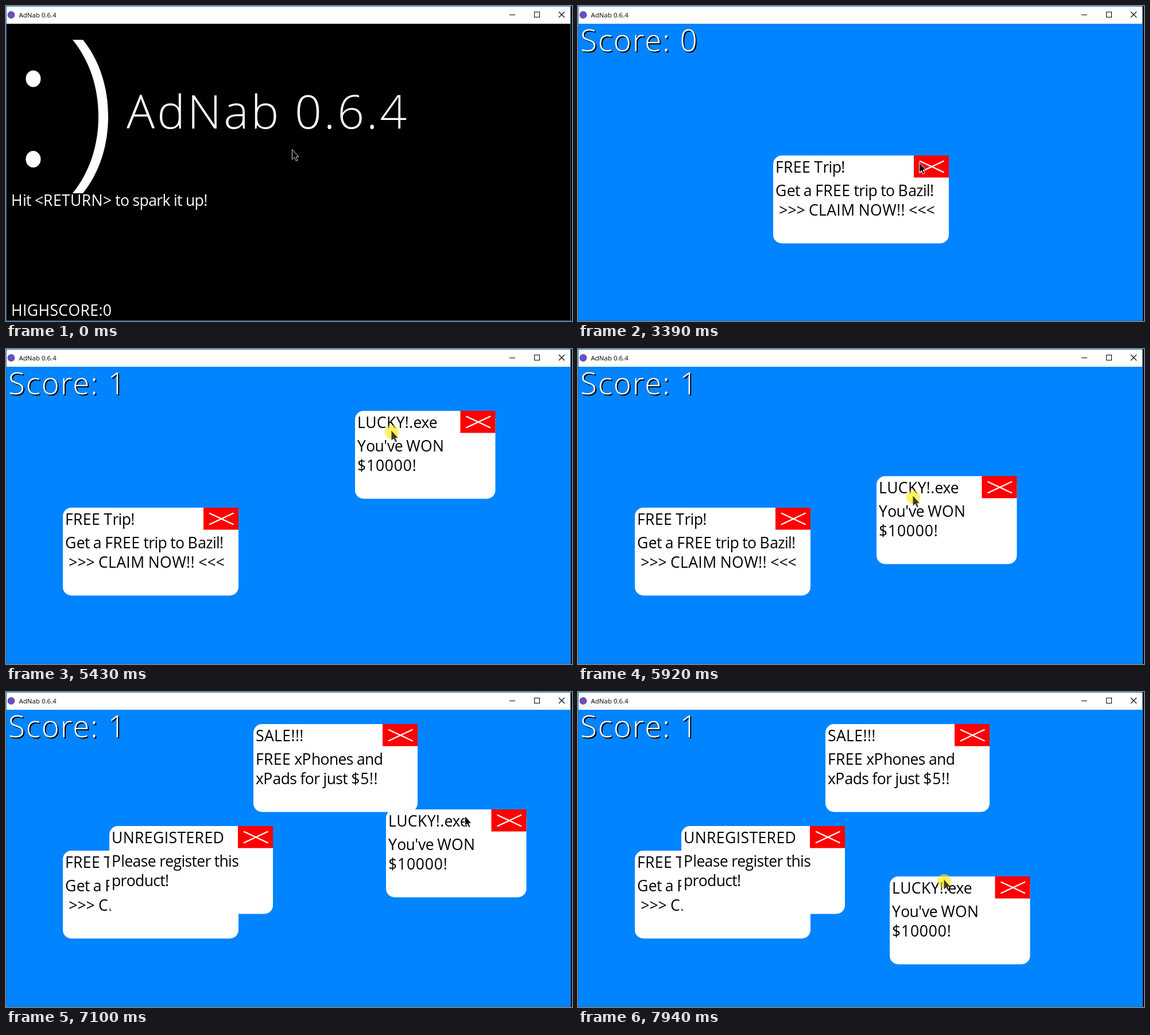
An HTML page with a canvas for the animation above (8 s loop, 986x550 px).

```html
<!DOCTYPE html>
<html lang="en">
<head>
<meta charset="utf-8">
<title>AdNab 0.6.4</title>
<style>
html, body { margin: 0; width: 100%; height: 100%; overflow: hidden; background: #000; }
canvas { display: block; }
</style>
</head>
<body>
<canvas id="stage" width="986" height="550"></canvas>
<script>
const ctx = document.getElementById('stage').getContext('2d');
const LOOP = 8000, STEP = 70;
const FACE = '"Open Sans", "Noto Sans", sans-serif';
const NAME = 'AdNab', VERSION = '0.6.4';

// Motion advances in steps of 70 ms, counted from these starts.
const starts = [0, 2970, 3790, 4250, 5220, 6060, 6960, 7800];

const cursorPath = [
  [2900, 498, 250], [3390, 594, 273], [3530, 612, 275], [4180, 612, 275],
  [4600, 780, 96], [5020, 736, 133], [5150, 736, 133], [5430, 671, 142],
  [5640, 593, 277], [5990, 581, 251], [6480, 728, 235], [6550, 728, 235],
  [6830, 858, 229], [6960, 872, 223], [7170, 763, 213], [7450, 596, 297],
  [7590, 644, 305], [7730, 692, 299], [7940, 637, 327]
];
const luckyPath = [
  [5150, 673, 99], [5430, 608, 108], [5640, 530, 243], [5990, 518, 217],
  [6550, 518, 217], [6830, 648, 211], [6960, 662, 205], [7170, 662, 205],
  [7450, 496, 289], [7590, 545, 297], [7730, 594, 292], [7940, 543, 322]
];
const presses = [[920, 1250], [3790, 3990], [5220, 5990], [6480, 6960], [7240, LOOP]];

const trip = ['FREE Trip!', 'Get a FREE trip to Bazil!', ' >>> CLAIM NOW!! <<<'];
const popups = [
  { from: 2570, to: 3860, path: [[0, 340, 261]], w: 306, lines: trip },
  { from: 4950, to: LOOP, path: [[0, 99, 277]], w: 306, lines: trip },
  { from: 6060, to: LOOP, path: [[0, 431, 56]], w: 286,
    lines: ['SALE!!!', 'FREE xPhones and', 'xPads for just $5!!'] },
  { from: 7030, to: LOOP, path: [[0, 180, 234]], w: 285,
    lines: ['UNREGISTERED', 'Please register this', 'product!'] },
  { from: 3920, to: LOOP, path: luckyPath, w: 244.5,
    lines: ['LUCKY!.exe', "You've WON", '$10000!'] }
];

const during = (t, [from, to]) => t >= from && t < to;

function stepped(t) {
  const start = starts.filter(s => s <= t).pop();
  return start + Math.floor((t - start) / STEP) * STEP;
}

function along(path, t) {
  const next = path.findIndex(p => p[0] > t);
  if (next === 0) return path[0].slice(1);
  if (next < 0) return path[path.length - 1].slice(1);
  const a = path[next - 1], b = path[next];
  const k = (t - a[0]) / (b[0] - a[0]);
  return [1, 2].map(i => Math.round(a[i] + (b[i] - a[i]) * k));
}

function rect(x, y, w, h, color) {
  ctx.fillStyle = color;
  ctx.fillRect(x, y, w, h);
}

function strokes(lines, color, width) {
  ctx.strokeStyle = color;
  ctx.lineWidth = width;
  ctx.beginPath();
  for (const [x1, y1, x2, y2] of lines) {
    ctx.moveTo(x1, y1);
    ctx.lineTo(x2, y2);
  }
  ctx.stroke();
}

function text(str, x, y, size, weight, color, gap = 0) {
  ctx.font = `${weight} ${size}px ${FACE}`;
  ctx.letterSpacing = gap + 'px';
  ctx.fillStyle = color;
  ctx.fillText(str, x, y);
  ctx.letterSpacing = '0px';
}

// Small text: capitals and digits sit loose, lowercase sits tight.
function tracking(c) {
  if (/[a-z ]/.test(c)) return -0.65;
  if (/[A-Z!:]/.test(c)) return 0.4;
  return /[\d$]/.test(c) ? 0.8 : 0;
}

function smallText(str, x, y, color) {
  ctx.font = `400 26.5px ${FACE}`;
  ctx.fillStyle = color;
  for (const c of str) {
    ctx.fillText(c, x, y);
    x += ctx.measureText(c).width + tracking(c);
  }
}

function drawFrame() {
  rect(0, 0, 986, 550, '#000');
  rect(0, 0, 984, 550, '#0a78d2');
  rect(1, 1, 982, 30, '#fff');
  ctx.fillStyle = '#6b4fbb';
  ctx.beginPath();
  ctx.arc(9, 15.5, 6.5, 0, 7);
  ctx.fill();
  text(`${NAME} ${VERSION}`, 22.5, 20, 11.5, 400, '#000');
  rect(877, 15, 10, 1, '#000');
  ctx.strokeStyle = '#000';
  ctx.lineWidth = 1;
  ctx.strokeRect(920.5, 10.5, 9, 9);
  strokes([[963, 10, 973, 20], [973, 10, 963, 20]], '#000', 1.1);
}

function drawMenu() {
  rect(1, 31, 982, 518, '#000');
  ctx.fillStyle = '#fff';
  for (const y of [127, 267.5]) {
    ctx.beginPath();
    ctx.ellipse(47.5, y, 13, 14.5, 0, 0, 7);
    ctx.fill();
  }
  ctx.fill(new Path2D('M134 59C163 95 178 142 178 193C178 243 163 291 134 327' +
    'H116C146 290 161 243 161 193C161 142 146 96 116 59Z'));
  text(NAME, 210, 214, 82, 300, '#fff', 4);
  text(VERSION, 503, 214, 82, 300, '#fff', 4);
  smallText('Hit <RETURN> to spark it up!', 9, 349, '#fff');
  smallText('HIGHSCORE:0', 9, 541, '#fff');
}

function drawPopup({ path, w, lines }, t) {
  const [x, y] = along(path, t);
  ctx.fillStyle = '#fff';
  ctx.beginPath();
  ctx.roundRect(x, y, w, 153.5, 15);
  ctx.fill();
  const bx = x + w - 61;
  rect(bx, y, 61, 38.5, '#f00');
  strokes([[bx + 10, y + 9.5, bx + 52.5, y + 29.5],
           [bx + 52.5, y + 9.5, bx + 10, y + 29.5]], '#fff', 2.4);
  [30, 71, 105].forEach((dy, i) => smallText(lines[i], x + 4, y + dy, '#000'));
}

function drawGame(t) {
  rect(1, 31, 983, 518, '#0084ff');
  const score = 'Score: ' + (t < 3860 ? 0 : 1);
  text(score, 6, 81, 53, 300, '#000', 1.9);
  text(score, 4, 79, 53, 300, '#fff', 1.9);
  for (const p of popups) {
    if (during(t, [p.from, p.to])) drawPopup(p, t);
  }
}

function drawCursor(t) {
  const [x, y] = along(cursorPath, t);
  const pressed = presses.some(p => during(t, p));
  ctx.save();
  ctx.translate(x, y);
  if (pressed) {
    ctx.fillStyle = 'rgba(255, 232, 0, 0.6)';
    ctx.beginPath();
    ctx.arc(1, 3, 12, 0, 7);
    ctx.fill();
    ctx.globalAlpha = 0.75;
  }
  const arrow = new Path2D('M.5 .5V18L4.5 14.2L7.3 20.5L10 19.3L7.2 13.2H12Z');
  ctx.fillStyle = '#000';
  ctx.fill(arrow);
  if (!pressed) {
    ctx.strokeStyle = t < 1650 ? '#e8d8e4' : '#fff';
    ctx.lineWidth = 1;
    ctx.stroke(arrow);
  }
  ctx.restore();
}

function draw(now) {
  const time = now % LOOP;
  const t = stepped(time);
  drawFrame();
  if (time < 1650) drawMenu();
  else drawGame(time < 2970 ? time : t);
  drawCursor(time < 2970 ? time : t);
  requestAnimationFrame(draw);
}
requestAnimationFrame(draw);
</script>
</body>
</html>
```
